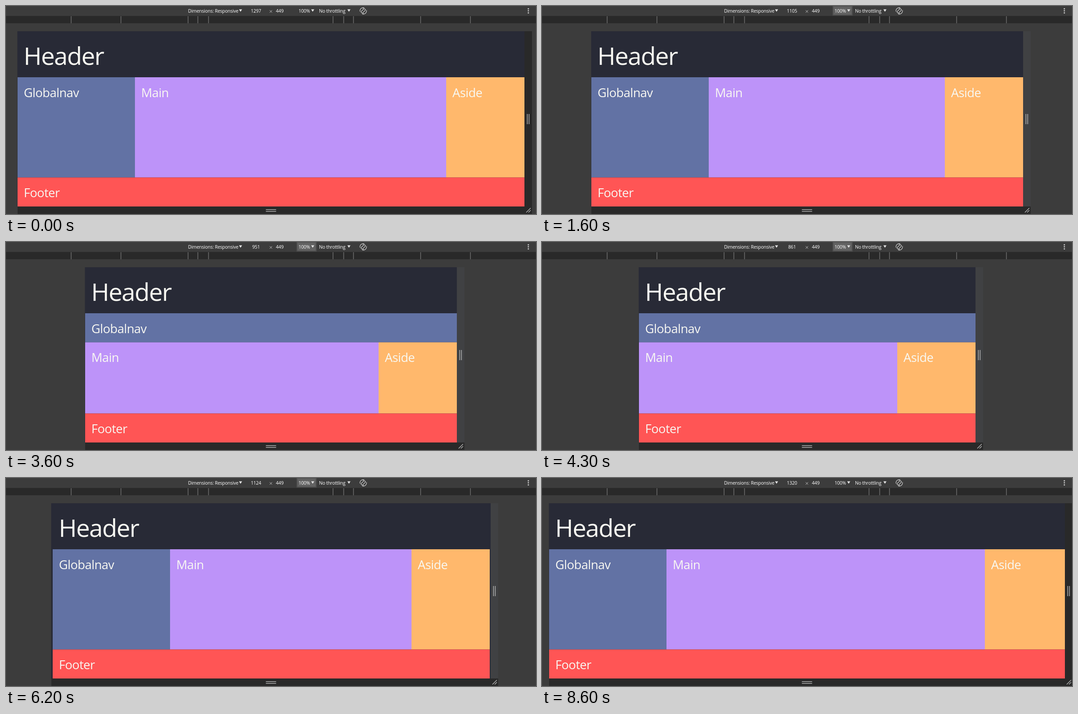
Write an HTML page that moves like this. It is 1192x470 px and loops after 8.7 s.

```html
<!DOCTYPE html>
<html lang="en">
<head>
<meta charset="utf-8">
<title>Responsive layout</title>
<style>
  html, body { margin: 0; width: 100%; height: 100%; overflow: hidden; background: #3c3c3c; }
  svg { display: block; width: 1192px; height: 470px; }
  text { font-family: "Open Sans", "Noto Sans", sans-serif; letter-spacing: -.02em; white-space: pre; }
  .bar { font-size: 10.4px; fill: #fff; }
  .page { font-size: 27.6px; fill: #f8f8f2; }
  #header { font-size: 55.3px; letter-spacing: -.03em; }
  .line { fill: none; stroke: #b4b4b4; stroke-width: 1.5; }
</style>
</head>
<body>
<svg viewBox="0 0 1192 470">
  <rect width="1192" height="470" fill="#3c3c3c"/>
  <rect y="22.5" width="1192" height="16.5" fill="#292929"/>
  <path id="ticks" stroke="#707070" stroke-width="1.5"/>

  <rect id="zoom" x="654.5" y=".5" width="43" height="20" fill="#626262" stroke="#505050" stroke-width="2"/>
  <g class="bar">
    <text x="409.5" y="14.6">Dimensions: Responsive</text>
    <text id="width" x="562.3" y="14.6" text-anchor="middle"></text>
    <text x="607" y="14.6">449</text>
    <text x="658" y="14.6">100%</text>
    <text x="704" y="14.6">No throttling</text>
    <path d="M524 7.5h7l-3.5 5.5zM686.3 7.5h7l-3.5 5.5zM767.8 7.5h7l-3.5 5.5z" fill="#e4e4e4"/>
  </g>
  <path d="M593 9.5l5.5 5.5m0-5.5l-5.5 5.5" stroke="#c0c0c0" fill="none"/>
  <g transform="translate(803.5 11) rotate(45)" fill="none" stroke="#c8c8c8" stroke-width="1.3">
    <rect x="-2.3" y="-5.5" width="4.6" height="11" rx="1"/>
    <path d="M-4 6.2A7.4 7.4 0 0 1-4-6.2l-.4 3.2M4-6.2A7.4 7.4 0 0 1 4 6.2l.4-3.2"/>
  </g>
  <g fill="#d0d0d0">
    <circle cx="1174.8" cy="6.2" r="1.5"/><circle cx="1174.8" cy="10.8" r="1.5"/><circle cx="1174.8" cy="15.4" r="1.5"/>
  </g>

  <rect id="side" y="57" width="17" height="396"/>
  <rect id="bottom" y="453" height="17" fill="#292929"/>
  <rect id="frame" y="57" height="396" fill="#282a36"/>
  <rect id="navBox" y="161" fill="#6272a4"/>
  <rect id="mainBox" fill="#bd93f9"/>
  <rect id="asideBox" fill="#ffb86c"/>
  <rect id="footerBox" y="387.5" height="65.5" fill="#ff5555"/>
  <g class="page">
    <text id="header" y="133.3">Header</text>
    <text id="nav" y="205.6">Globalnav</text>
    <text id="main">Main</text>
    <text id="aside">Aside</text>
    <text id="footer" y="432">Footer</text>
  </g>
  <path class="line" d="M584.5 460.2h23m-23 4h23"/>
  <path id="grips" class="line" d="M6.4 244v23m4-23v23M4 466.5l10-10m-5 10l5-5"/>
</svg>
<script>
const SCALE = .879, MID = 596.15, LOOP = 8700, BREAKPOINT = 960;
const TOP = 161, ROW = 65.7, FOOT = 387.5;

// [time in ms, viewport width]
const keys = [
  [700, 1297], [1600, 1105], [1800, 1082], [2000, 1082], [2900, 1021],
  [3800, 931], [4300, 861], [4400, 861], [4600, 850], [4900, 850],
  [5800, 1025], [6200, 1124], [6700, 1238], [6800, 1254], [6900, 1254],
  [7300, 1292], [7600, 1320]
];

const $ = id => document.getElementById(id);
const set = (id, attrs) => {
  for (const name in attrs) $(id).setAttribute(name, attrs[name]);
};

function widthAt(t) {
  const i = keys.findIndex(k => k[0] >= t);
  if (i < 0) return keys[keys.length - 1][1];
  if (i === 0) return keys[0][1];
  const [t0, w0] = keys[i - 1], [t1, w1] = keys[i];
  return w0 + (w1 - w0) * (t - t0) / (t1 - t0);
}

function draw(time) {
  const t = Math.floor(time % LOOP / 100) * 100;
  const w = widthAt(t), half = w * SCALE / 2;
  const left = Math.round(MID - half), right = Math.round(MID + half);

  // While the viewport grows, its content trails a little behind.
  const growth = Math.max(0, Math.min(w - widthAt(t - 100), widthAt(t + 100) - w));
  const x = left + Math.round(growth * .13), end = right - Math.round(growth * .09);

  const wide = w >= BREAKPOINT;
  const navW = wide ? Math.round(300 * SCALE) : end - x;
  const mainX = wide ? x + navW : x;
  const asideX = end - (t >= 7600 ? 180 : Math.round(200 * SCALE));
  const y = wide ? TOP : TOP + ROW, h = FOOT - y;

  set('side', { x: right, fill: t >= 200 && t < 7900 ? '#404143' : '#292929' });
  set('bottom', { x: left, width: right - left + 17 });
  set('frame', { x: left - .5, width: right - left + .5 });
  set('navBox', { x, width: navW, height: wide ? h : ROW });
  set('mainBox', { x: mainX, y, width: asideX - mainX, height: h });
  set('asideBox', { x: asideX, y, width: end - asideX, height: h });
  set('footerBox', { x, width: end - x });

  set('header', { x: x + 13.6 });
  set('nav', { x: x + 14 });
  set('main', { x: mainX + 14, y: y + 44.6 });
  set('aside', { x: asideX + 14, y: y + 44.6 });
  set('footer', { x: x + 14 });

  set('grips', { transform: `translate(${right} 0)` });
  set('zoom', { visibility: t >= 600 && t < 8600 ? 'visible' : 'hidden' });
  $('width').textContent = Math.round(w);
}

set('ticks', {
  d: [320, 375, 425, 768, 1024].map(size => {
    const d = Math.round(size * .877 / 2);
    return `M${595.5 - d} 23v16M${595.5 + d} 23v16`;
  }).join('')
});

const start = performance.now();
function loop() {
  draw(performance.now() - start);
  requestAnimationFrame(loop);
}
loop();
</script>
</body>
</html>
```
